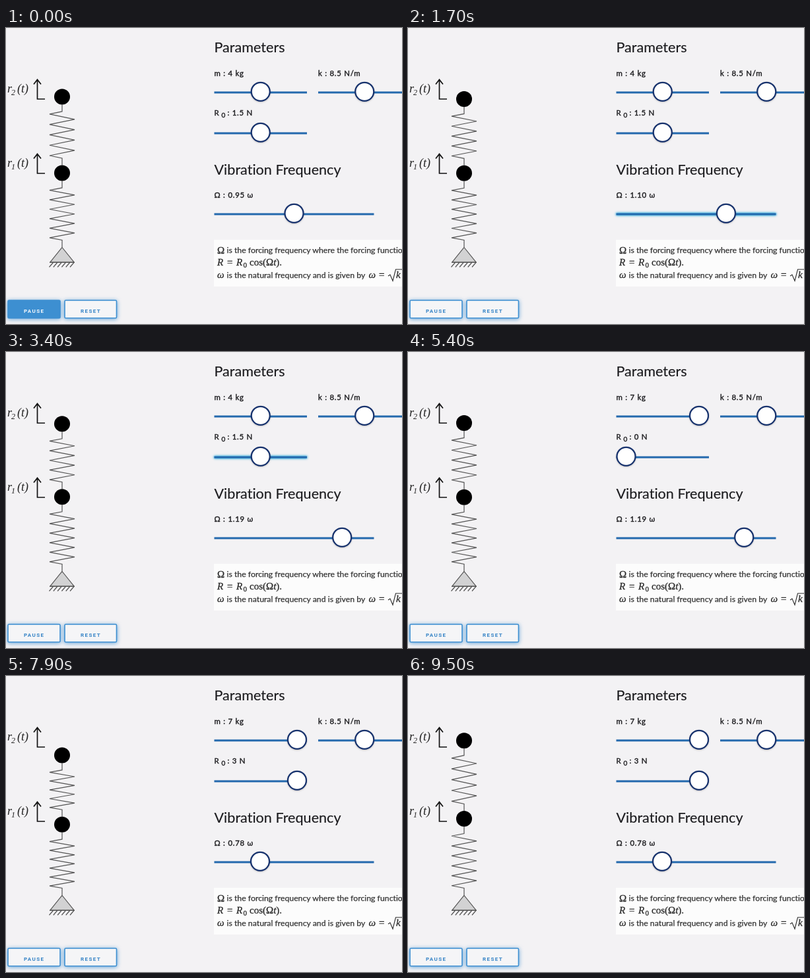
An HTML page that plays this animation: 600x450 px, repeating every 9.6 s.

```html
<!DOCTYPE html>
<html lang="en">
<head>
<meta charset="utf-8">
<title>Two-mass vibration</title>
<style>
  html, body { margin: 0; width: 100%; height: 100%; overflow: hidden; background: #f3f2f4; }
  svg { display: block; width: 600px; height: 450px; font-family: Lato, "Open Sans", sans-serif; font-variant-ligatures: none; fill: #1c1c1f; }
  .title { font-size: 21.6px; stroke: #1c1c1f; stroke-width: .15px; }
  .label { font-size: 11.4px; letter-spacing: .75px; stroke: #1c1c1f; stroke-width: .4px; white-space: pre; }
  .note { font-size: 12.3px; fill: #333; stroke: #333; stroke-width: .25px; }
  .math { font-family: "Liberation Serif", serif; font-size: 15px; fill: #2a2a2a; stroke: #2a2a2a; stroke-width: .3px; }
  .it { font-style: italic; }
  .coord { font: italic 18px "Liberation Serif", serif; fill: #222; }
  .arrow { fill: none; stroke: #111; stroke-width: 1.7; }
  .thin { fill: none; stroke: #555; stroke-width: 1.2; }
  .track { stroke: #2369ad; stroke-width: 3; }
  .knob { fill: #fff; stroke: #17326d; stroke-width: 2.2; filter: drop-shadow(0 1px 1px #0003); }
  .hot { filter: drop-shadow(0 0 1.5px #46b4e0) drop-shadow(0 0 1.5px #46b4e0); }
  .button rect { fill: #f5f5f7; stroke: #3d8fd1; stroke-width: 1.6; filter: drop-shadow(0 1px 3px #3d8fd1cc); }
  .button text { font: 700 8px Roboto, sans-serif; letter-spacing: 1.4px; fill: #3583c6; }
  .button.on rect { fill: #3d8fd1; }
  .button.on text { fill: #f4f8fc; }
</style>
</head>
<body>
<svg viewBox="0 0 600 450">
  <g id="coords"></g>
  <path id="upper" class="thin"/>
  <path id="lower" class="thin"/>
  <circle id="mass2" cx="85" r="12" fill="#000"/>
  <circle id="mass1" cx="85" r="12" fill="#000"/>
  <path d="M85 333.5L103 356H67Z" fill="#d2d2d3" stroke="#555" stroke-width="1.2"/>
  <path id="ground" class="thin"/>

  <g id="pause" class="button"><rect x="3" y="414" width="79" height="27" rx="1.5"/><text x="27" y="432.5">PAUSE</text></g>
  <g class="button"><rect x="89" y="414" width="78.5" height="27" rx="1.5"/><text x="113" y="432.5">RESET</text></g>

  <text class="title" x="315.5" y="37">Parameters</text>
  <text class="title" x="315.5" y="223">Vibration Frequency</text>
  <g id="sliders"></g>

  <rect x="315" y="322" width="285" height="71" fill="#fcfcfc"/>
  <text class="math" x="320" y="343">Ω</text>
  <text class="note" x="334.5" y="342">is the forcing frequency where the forcing function</text>
  <text class="math" y="361"><tspan class="it" x="320">R</tspan><tspan x="335">=</tspan><tspan class="it" x="349">R</tspan><tspan x="359.5" dy="3" font-size="11">0</tspan><tspan x="369" dy="-3">cos(Ω</tspan><tspan class="it">t</tspan>).</text>
  <text class="math it" x="320" y="380">ω</text>
  <text class="note" x="334.5" y="380">is the natural frequency and is given by</text>
  <text class="math" y="380"><tspan class="it" x="549.5">ω</tspan><tspan x="565">=</tspan><tspan class="it" x="591">k</tspan></text>
  <path d="M579 377l3-2 4 9.5L590.5 367H600" fill="none" stroke="#2a2a2a" stroke-width="1.1"/>
</svg>
<script>
const LOOP = 9600, STEP = 100;
const REST2 = 107.9, REST1 = 220.8, RADIUS = 12, GAIN = 2.05;
const $ = id => document.getElementById(id);

// Each drag: [start ms, end ms, new value]
const sliders = {
  m: { x: 315.5, y: 97, length: 140.5, min: 1, max: 7, step: .5, start: 4,
       drags: [[4300, 4900, 7]], text: v => `m : ${v} kg` },
  k: { x: 473, y: 97, length: 140.5, min: 2, max: 15, step: .5, start: 8.5,
       drags: [], text: v => `k : ${v} N/m` },
  force: { x: 315.5, y: 159, length: 140.5, min: 0, max: 3, step: .1, start: 1.5,
       drags: [[3500, 4000, 0], [7000, 7500, 3]],
       text: v => `R<tspan dx="3" dy="3" font-size="10">0</tspan><tspan dx="2.5" dy="-3">: ${v} N</tspan>` },
  freq: { x: 315.5, y: 282, length: 242, min: .6, max: 1.3, step: .01, start: .95,
       drags: [[1300, 2000, 1.19], [5700, 6400, .78]], text: v => `Ω : ${v.toFixed(2)} ω` }
};

for (const [name, s] of Object.entries(sliders)) {
  const labelY = s.y - (name === 'force' ? 26 : 24);
  $('sliders').insertAdjacentHTML('beforeend', `
    <text class="label" x="${s.x}" y="${labelY}"></text>
    <path class="track" d="M${s.x} ${s.y + 1}h${s.length}"/>
    <circle class="knob" cy="${s.y - .2}" r="14"/>`);
  [s.label, s.track, s.knob] = [...$('sliders').children].slice(-3);
}

for (const [index, base] of [[2, 108], [1, 221]]) {
  $('coords').insertAdjacentHTML('beforeend', `
    <text class="coord" x="2" y="${base - 10.5}">r<tspan x="8" dy="4" font-size="12">${index}</tspan><tspan x="17" dy="-4">(t)</tspan></text>
    <path class="arrow" d="M59 ${base}H47.5V${base - 29}M42 ${base - 22.5}L47.5 ${base - 29.5}L53 ${base - 22.5}"/>`);
}

let hatch = 'M66 356.3H104';
for (let i = 0; i < 6; i++) hatch += `M${71.5 + i * 6.3} 356.5l-6 7`;
$('ground').setAttribute('d', hatch);

function valueAt(s, t) {
  let value = s.start;
  for (const [from, to, target] of s.drags) {
    const p = Math.min(1, Math.max(0, (t - from) / (to - from)));
    value += (target - value) * p * p * (3 - 2 * p);
  }
  return +(Math.round(value / s.step) * s.step).toFixed(2);
}

function spring(top, bottom, tips) {
  const lead = 10.5, a = top + lead, unit = (bottom - lead - a) / tips;
  let d = `M85 ${top}V${a}`;
  for (let i = 0; i < tips; i++) d += `L${i % 2 ? 104 : 66} ${a + (i + .5) * unit}`;
  return d + `L85 ${bottom - lead}V${bottom}`;
}

function phaseAt(sec) {
  if (sec < 2) return 2.77 * sec;
  if (sec < 6) return 5.54 + 3.47 * (sec - 2);
  return 2.76 + 1.72 * (sec - 7.9);
}

function draw(t) {
  const now = {};
  for (const [name, s] of Object.entries(sliders)) {
    const value = now[name] = valueAt(s, t);
    const part = (value - s.min) / (s.max - s.min);
    s.label.innerHTML = s.text(value);
    s.knob.setAttribute('cx', s.x + 15 + part * (s.length - 30));
    s.track.classList.toggle('hot', s.drags.some(([from, to]) => t >= from - 100 && t <= to + 100));
  }
  $('pause').classList.toggle('on', t < 1200);

  // Steady response of two equal masses, driven at the lower one
  const r = now.freq ** 2;
  const swing = GAIN * now.force / (1 - (2 - r) * (1 - r)) * Math.cos(phaseAt(t / 1000));
  const y2 = REST2 - swing, y1 = REST1 - swing * (1 - r);
  $('mass2').setAttribute('cy', y2);
  $('mass1').setAttribute('cy', y1);
  $('upper').setAttribute('d', spring(y2 + RADIUS, y1 - RADIUS, 9));
  $('lower').setAttribute('d', spring(y1 + RADIUS, 333, 11));
}

const began = performance.now();
function tick() {
  const t = (performance.now() - began) % LOOP;
  draw(Math.floor(t / STEP) * STEP);
  requestAnimationFrame(tick);
}
tick();
</script>
</body>
</html>
```
